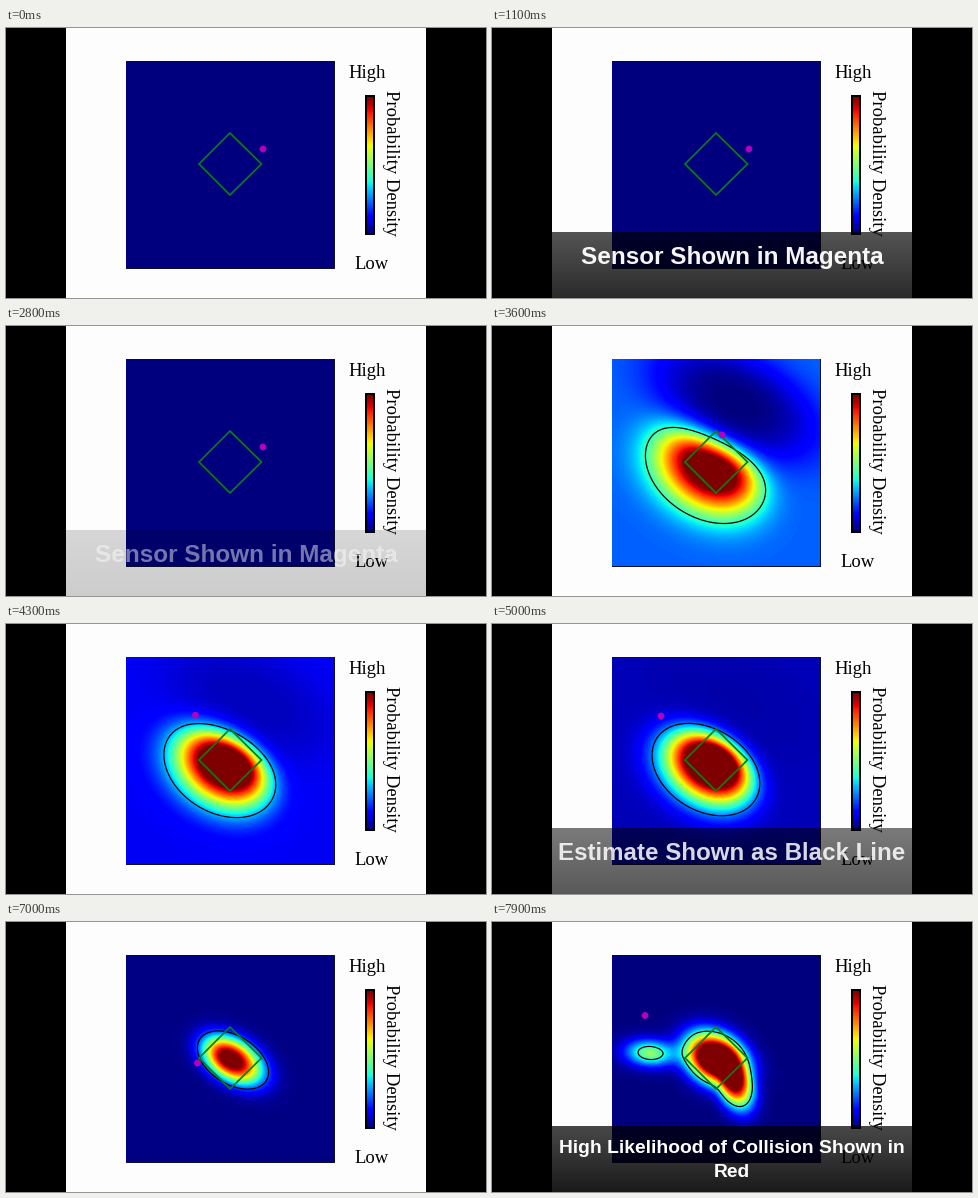
A matplotlib script that plays this animation: 480 by 270 pixels, repeating every 8000 ms.

```python
import numpy as np
import matplotlib.pyplot as plt
from matplotlib.animation import FuncAnimation
from matplotlib.patches import Circle, Polygon, Rectangle

W, H, DPI = 480, 270, 100
STEP, FRAMES = 100, 80
PX = 72 / DPI                      # points per pixel
LEFT, RIGHT, TOP, BOTTOM = 120, 328, 33, 240
CORE = np.array([224, 137])        # centre of the object
START = 3.25                       # first measurement, seconds
TILT = 32

# time: half axes, shift from the core, peak
SHAPES = {5.0: (56, 40, -10, 8, 1.45), 6.2: (33, 29, 1, 2, 1.0),
          7.0: (39, 24, 3, 1, 1.1), 7.9: (34, 25, 0, 0, 1.35)}

# time: sensor position
PATH = {3.2: (257, 121), 3.6: (230, 109), 5.0: (169, 92),
        6.2: (203, 165), 7.0: (191.5, 141), 7.9: (153, 93.5)}

# text, size, first baseline, start, end, fade time
CAPTIONS = [
    ("Sensor Shown in Magenta", 24.3, 236, 0.45, 2.95, 0.7),
    ("Estimate Shown as Black Line", 24.1, 236, 4.4, 6.62, 0.83),
    ("High Likelihood of Collision Shown in\nRed", 19.3, 231, 7.0, 9.5, 0.7),
]

gx, gy = np.meshgrid(np.arange(LEFT, RIGHT) + 0.5, np.arange(TOP, BOTTOM) + 0.5)


def turned(dx, dy, a, b, tilt):
    """Coordinates along the axes of a tilted ellipse, 1 on its rim."""
    c, s = np.cos(np.radians(tilt)), np.sin(np.radians(tilt))
    return (dx * c + dy * s) / a, (dy * c - dx * s) / b


def radius(cx, cy, a, b, tilt):
    return np.hypot(*turned(gx - cx, gy - cy, a, b, tilt))


def core_radius(a, b, dx, dy):
    """Like radius, with rings sliding from the core to the shifted rim."""
    qx, qy = turned(gx - CORE[0], gy - CORE[1], a, b, TILT)
    sx, sy = turned(dx, dy, a, b, TILT)
    dot, k = qx * sx + qy * sy, 1 - sx**2 - sy**2
    return (np.sqrt(dot**2 + k * (qx**2 + qy**2)) - dot) / k


def bump(r, peak, level, base=0.0, power=2.4):
    """Fall from peak to base, passing level at r = 1."""
    rise = peak - base
    return base + rise * ((level - base) / rise) ** (r ** power)


SHADOW = np.exp(-0.7 * radius(244, 76, 80, 43, 27) ** 3)
TAIL = bump(radius(240, 153, 33, 18, 70), 1.2, 0.4)
ISLAND = bump(radius(158, 131, 12, 6.5, 4), 0.52, 0.4, power=2)


def density(t):
    """Density map and the level of the estimate line."""
    base = 0.22 * np.exp(-1.06 * (t - 3.6))
    lobes = np.clip((t - 7) / 0.9, 0, 1)
    level = base + 0.2 + 0.2 * lobes
    a, b, dx, dy, peak = (np.interp(t, list(SHAPES), col)
                          for col in zip(*SHAPES.values()))
    grow = 1 + 0.75 * base
    p = bump(core_radius(a * grow, b * grow, dx, dy), peak - base, level, base)
    p = p * (1 - min(1, base / 0.22) * SHADOW)
    return np.cbrt(p**3 + (lobes * TAIL)**3) + lobes * ISLAND, level


def sensor_at(t):
    """Cubic Hermite path through the waypoints."""
    times, pts = np.array(list(PATH)), np.array(list(PATH.values()))
    t = np.clip(t, times[0], times[-1])
    slopes = np.gradient(pts, times, axis=0)
    i = min(np.searchsorted(times, t, side="right") - 1, len(times) - 2)
    d = times[i + 1] - times[i]
    u = (t - times[i]) / d
    ease = u * u * (3 - 2 * u)
    return ((1 - ease) * pts[i] + ease * pts[i + 1]
            + d * u * (1 - u) * ((1 - u) * slopes[i] - u * slopes[i + 1]))


fig = plt.figure(figsize=(W / DPI, H / DPI), dpi=DPI, facecolor="black")
ax = fig.add_axes([0, 0, 1, 1])
ax.axis("off")


def box(x, y, w, h, color, z):
    ax.add_patch(Rectangle((x, y), w, h, color=color, lw=0, zorder=z))


box(60, 0, 360, H, "#fdfdfd", 0)
box(LEFT, TOP - 0.5, RIGHT - LEFT + 0.5, BOTTOM - TOP + 1, "#101030", 1)
heat = ax.imshow(np.zeros(gx.shape), cmap="jet", vmin=0, vmax=1, aspect="auto",
                 extent=(LEFT, RIGHT, BOTTOM, TOP), zorder=2)
ax.add_patch(Polygon([(224, 105), (255.5, 136), (224, 167), (193, 136)],
                     fill=False, ec="#0a7d14", lw=1.7 * PX, zorder=4))
sensor = ax.add_patch(Circle((0, 0), 3.4, fc="#b400be", lw=0, zorder=5))

# colour scale
box(359, 67, 10, 140, "black", 1)
ax.imshow(np.linspace(1, 0, 256)[:, None], cmap="jet", aspect="auto",
          extent=(361, 367, 205, 69), zorder=2)
serif = dict(family="Liberation Serif", size=18.7 * PX, color="black", zorder=3)
ax.text(342, 50, "High", va="baseline", **serif)
ax.text(348.5, 241, "Low", va="baseline", **serif)
ax.text(376, 62, "Probability Density", rotation=270, ha="left", va="top",
        **serif)

# caption band, darker towards the bottom
shade = np.zeros((66, 1, 4))
shade[:, 0, 3] = np.linspace(0.72, 0.9, 66)
band = ax.imshow(shade, extent=(60, 420, H, 204), aspect="auto", zorder=8)
titles = [[ax.text(240, y + 24 * i, line, ha="center", va="baseline",
                   color="white", family="Liberation Sans", weight="bold",
                   size=size * PX, zorder=9)
           for i, line in enumerate(text.split("\n"))]
          for text, size, y, *_ in CAPTIONS]

ax.set_xlim(0, W)
ax.set_ylim(H, 0)
outline = []


def draw(n):
    t = n * STEP / 1000
    while outline:
        outline.pop().remove()
    if t < START:
        heat.set_data(np.zeros(gx.shape))
    else:
        p, level = density(t)
        heat.set_data(np.clip(p, 0, 1))
        outline.append(ax.contour(gx, gy, p, levels=[level], colors="black",
                                  linewidths=1.2 * PX, zorder=3))
    sensor.center = tuple(sensor_at(t))

    shown = 0
    for (*_, start, end, ramp), lines in zip(CAPTIONS, titles):
        fade = float(np.clip(min(t - start, end - t) / ramp, 0, 1))
        for line in lines:
            line.set_alpha(fade ** 0.5)
        shown = max(shown, fade)
    band.set_alpha(shown)
    return []


anim = FuncAnimation(fig, draw, frames=FRAMES, interval=STEP, repeat=True,
                     repeat_delay=0, init_func=lambda: draw(0), blit=False)
plt.show()
```
